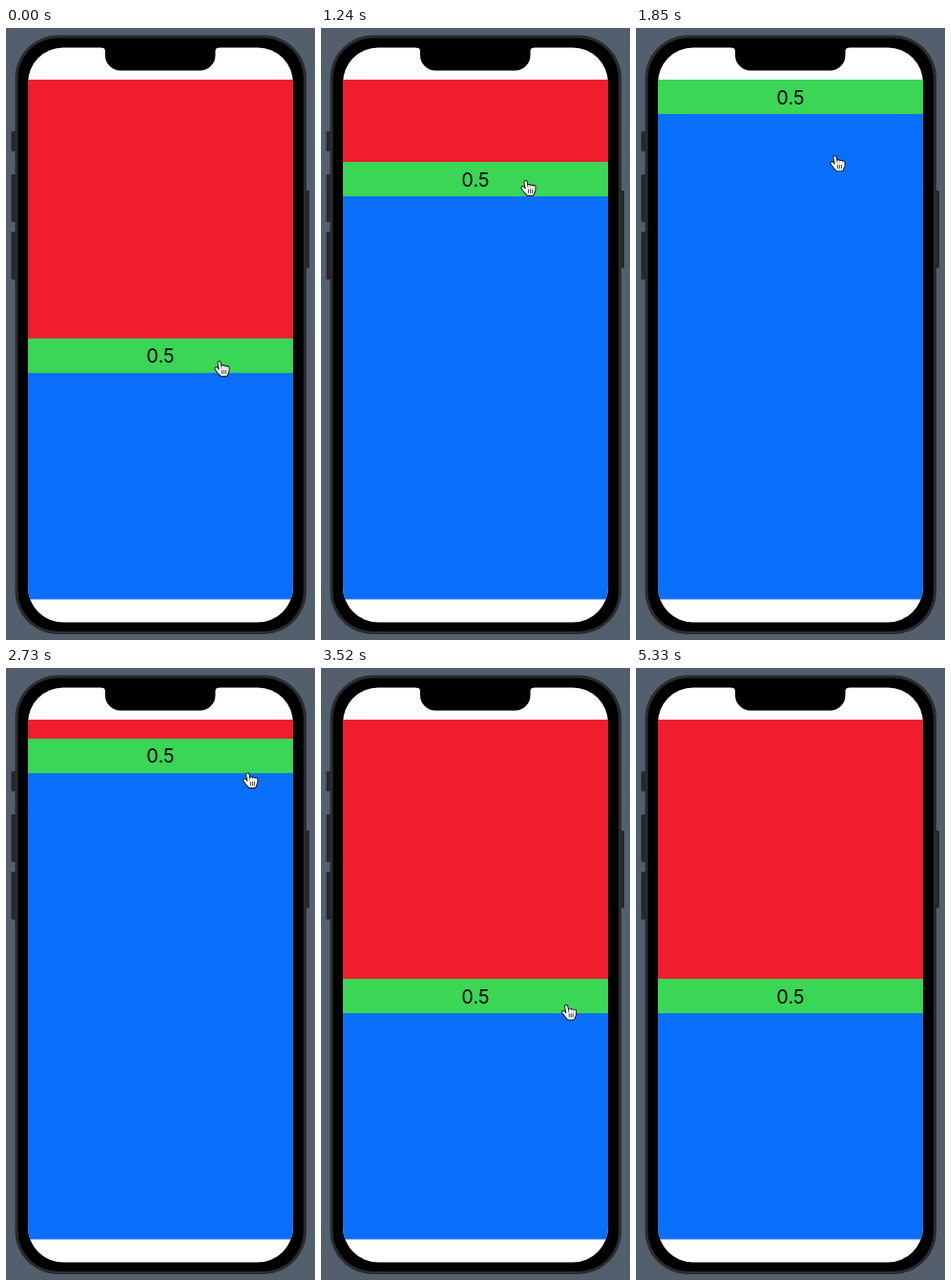
An HTML page with a canvas for the animation above (5.36 s loop, 324x640 px).

```html
<!DOCTYPE html>
<html lang="en">
<head>
<meta charset="utf-8">
<title>Split view drag</title>
<style>
html, body { margin: 0; width: 100%; height: 100%; overflow: hidden; background: #535f6d; }
canvas { display: block; width: 324px; height: 640px; }
</style>
</head>
<body>
<canvas id="stage" width="324" height="640"></canvas>
<script>
const ctx = document.getElementById('stage').getContext('2d');
const LOOP = 5360;
const SCREEN = { x: 23, y: 20.5, w: 278, h: 601 };
const TOP = 54, BOTTOM = 597.5, BAR = 36, MAX_BAR = 325;
const SECOND_GRAB = 2520, HIDE_AT = 4660;

const easeIn = u => 1 - Math.cos(u * Math.PI / 2);
const easeOut = u => 1 - (1 - u) ** 2;
const easeInOut = u => u * u * (3 - 2 * u);
const clamp = (v, lo, hi) => Math.min(hi, Math.max(lo, v));

// The hand's moves: start and end time, where it goes, and how
const home = { x: 223.5, y: 349.5 };
const moves = [
  { from: 0, to: 740, x: 219, y: 244, ease: easeOut },
  { from: 940, to: 1580, x: 209, y: 60, ease: easeInOut },
  { from: 1600, to: 1850, x: 208.5, y: 134.5, ease: easeInOut },
  { from: 1900, to: 2360, x: 253, y: 90.5, ease: easeInOut },
  { from: SECOND_GRAB, to: 3400, x: 257, y: 375, ease: easeIn },
  { from: 3400, to: 3820, x: 257.5, y: 265, ease: easeInOut },
  { from: 4520, to: HIDE_AT, x: 304, y: 272, ease: easeIn }
];

function handAt(t) {
  let { x, y } = home;
  for (const m of moves) {
    const u = m.ease(clamp((t - m.from) / (m.to - m.from), 0, 1));
    x += (m.x - x) * u;
    y += (m.y - y) * u;
  }
  return { x, y };
}

// The bar follows the hand in both drags, up to its limits
function barAt(t) {
  const [up, , , reach, down] = moves;
  if (t < SECOND_GRAB) {
    const y = handAt(Math.min(t, moves[1].to)).y;
    return clamp(MAX_BAR + 0.977 * (y - home.y), TOP, MAX_BAR);
  }
  return clamp(TOP + handAt(Math.min(t, down.to)).y - reach.y, TOP, MAX_BAR);
}

function rounded(x, y, w, h, r, fill) {
  ctx.beginPath();
  ctx.roundRect(x, y, w, h, r);
  ctx.fillStyle = fill;
  ctx.fill();
}

function rect(x, y, w, h, fill) {
  ctx.fillStyle = fill;
  ctx.fillRect(x, y, w, h);
}

function drawBody() {
  rect(0, 0, 324, 640, '#535f6d');
  for (const [y, h] of [[108, 21], [153, 50], [213, 50]]) rounded(5.5, y, 5, h, 1, '#25272a');
  rounded(314, 170, 4, 81, 1, '#25272a');
  rounded(9.5, 7.5, 305.5, 626.5, 45, '#2b2c2e');
  rounded(12.5, 10.5, 299.5, 620.5, 42, '#000');
}

function drawNotch() {
  const l = 104, r = 219.5, y = SCREEN.y, b = 44.5;
  ctx.beginPath();
  ctx.moveTo(l - 4, y - 1);
  ctx.lineTo(l - 4, y);
  ctx.quadraticCurveTo(l, y, l, y + 4);
  ctx.arcTo(l, b, l + 16, b, 16);
  ctx.arcTo(r, b, r, b - 16, 16);
  ctx.lineTo(r, y + 4);
  ctx.quadraticCurveTo(r, y, r + 4, y);
  ctx.lineTo(r + 4, y - 1);
  ctx.fillStyle = '#000';
  ctx.fill();
}

function drawScreen(bar) {
  const { x, y, w, h } = SCREEN;
  ctx.save();
  rounded(x, y, w, h, 37, '#fff');
  ctx.clip();
  rect(x, TOP, w, BOTTOM - TOP, '#0a6ffa');
  rect(x, TOP, w, bar - TOP, '#ef1d2d');
  rect(x, bar, w, BAR, '#3ad655');
  ctx.restore();
  ctx.fillStyle = '#000';
  ctx.font = '20px Inter, "Liberation Sans", sans-serif';
  ctx.textAlign = 'center';
  ctx.fillText('0.5', 162, bar + 25.5);
  drawNotch();
}

// Pointing hand built from thick round strokes, fingertip at the origin
function line(path, x1, y1, x2, y2) {
  path.moveTo(x1, y1);
  path.lineTo(x2, y2);
}

const hand = new Path2D(), creases = new Path2D();
line(hand, 0.1, 1, 1.6, 9);
line(hand, -2.9, 7, 0.6, 11.5);
for (let i = 0; i < 3; i++) {
  line(hand, 3.9 + 2.5 * i, 4.9 + 0.5 * i, 3.9 + 2.5 * i, 9);
  line(creases, 3.1 + 2 * i, 8.8, 3.1 + 2 * i, 12.2);
}
hand.moveTo(0.6, 9);
hand.lineTo(9, 9);
hand.lineTo(7.3, 13.5);
hand.lineTo(2.2, 13.5);
hand.closePath();

function drawHand({ x, y }) {
  ctx.save();
  ctx.translate(x, y);
  ctx.lineCap = ctx.lineJoin = 'round';
  for (const [color, width, path] of [['#111', 4.2, hand], ['#fff', 2.3, hand], ['#111', 0.8, creases]]) {
    ctx.strokeStyle = color;
    ctx.lineWidth = width;
    ctx.stroke(path);
    if (color === '#fff') {
      ctx.fillStyle = color;
      ctx.fill(path);
    }
  }
  ctx.restore();
}

const start = performance.now();

function frame() {
  const t = (performance.now() - start) % LOOP;
  drawBody();
  drawScreen(barAt(t));
  if (t < HIDE_AT) drawHand(handAt(t));
  requestAnimationFrame(frame);
}
frame();
</script>
</body>
</html>
```
